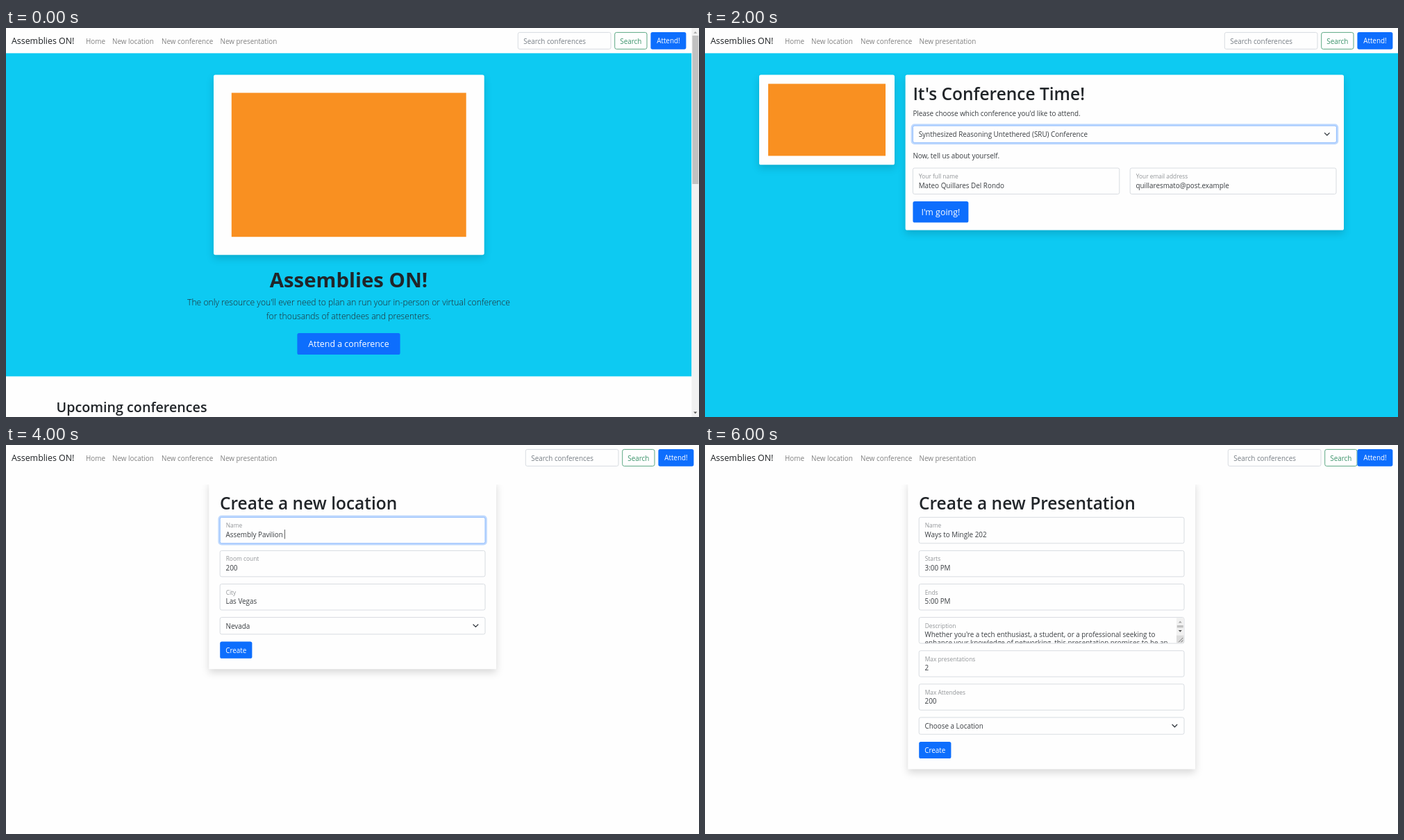
An HTML page for the animation above (7 s loop, 998 by 561 pixels).

```html
<!DOCTYPE html>
<html lang="en">
<head>
<meta charset="utf-8">
<title>Conference pages</title>
<style>
  html, body { margin: 0; width: 100%; height: 100%; overflow: hidden; background: #fefefe; }
  svg { display: block; width: 998px; height: 561px; }
  text { font-family: "Open Sans", "Noto Sans", sans-serif; white-space: pre; }
  .page { visibility: hidden; }
  .page.on { visibility: visible; }
  .shadow { filter: drop-shadow(0 5.2px 5.2px rgba(0, 0, 0, .15)); }
</style>
</head>
<body>
<svg id="stage" viewBox="0 0 998 561">
  <defs>
    <clipPath id="line"><rect x="309" y="249" width="373" height="36"/></clipPath>
    <clipPath id="area"><rect x="309" y="249" width="369" height="36.5"/></clipPath>
  </defs>
</svg>
<script>
const BODY = 9.9, LEAD = 12.4, H2 = 19.7, H1 = 24.5;
const NAV_END = 36.2, CARD_TOP = 67.5;
const INK = '#212529', BLUE = '#0d6efd', CYAN = '#0dcaf2', WHITE = '#fefefe', LINE = '#d4d9de', ORANGE = '#f99021';
const BRAND = 'Assemblies ON!';
const AI_EVENT = 'Synthesized Reasoning Untethered (SRU) Conference';

const attrs = o => Object.entries(o).map(([k, v]) => `${k}="${v}"`).join(' ');
const text = (x, y, str, size = BODY, fill = '#3a3e42', more = {}) =>
  `<text ${attrs({ x, y, 'font-size': size, fill, ...more })}>${str}</text>`;
const rect = (x, y, x2, y2, fill, more = {}) =>
  `<rect ${attrs({ x, y, width: x2 - x, height: y2 - y, fill, ...more })}/>`;
const path = (d, more) => `<path ${attrs({ d, fill: 'none', ...more })}/>`;
const mid = { 'text-anchor': 'middle' };
const semi = { 'font-weight': 600 };

const card = (x, y, x2, y2, rx = 2.6) => rect(x, y, x2, y2, WHITE, { rx, class: 'shadow' });
const box = (x, y, x2, y2, focus) =>
  (focus ? rect(x - 1.2, y - 1.2, x2 + 1.2, y2 + 1.2, 'none', { rx: 3.5, stroke: '#bfd9fe', 'stroke-width': 3.2 }) : '') +
  rect(x, y, x2, y2, WHITE, { rx: 2.4, stroke: focus ? '#86b7fe' : LINE, 'stroke-width': .9 });
const button = (x, y, x2, y2, label, size = BODY) =>
  rect(x, y, x2, y2, BLUE, { rx: 2.6 }) +
  text((x + x2) / 2, (y + y2) / 2 + size * .39, label, size, '#fff', mid);
const chevron = (x, y) => path(`M${x} ${y}l3.4 3.4l3.4 -3.4`,
  { stroke: '#343a40', 'stroke-width': 1.3, 'stroke-linecap': 'round', 'stroke-linejoin': 'round' });
const select = (x, y, x2, label, focus) =>
  box(x, y, x2, y + 24.3, focus) + text(x + 8.3, y + 16.3, label) + chevron(x2 - 17, y + 10.4);
const field = (x, y, x2, label, value, focus, more) =>
  box(x, y, x2, y + 37.5, focus) + text(x + 8.5, y + 15, label, 8.4, '#929598') +
  text(x + 8.3, y + 28.6, value, BODY, '#3a3e42', more);

function nav(dx = 0, fieldDx = dx, right = 998) {
  const links = [[115, 'Home'], [153, 'New location'], [224, 'New conference'], [308.5, 'New presentation']];
  return rect(0, 0, right, NAV_END, WHITE) + text(8, 23.4, BRAND, LEAD, '#1c1f22') +
    links.map(([x, s]) => text(x, 22.5, s, BODY, '#818181')).join('') +
    box(737.3 + fieldDx, 6.4, 871 + fieldDx, 30.4) +
    text(745.3 + fieldDx, 22.5, 'Search conferences', BODY, '#787f86') +
    rect(876.7 + fieldDx, 6.4, 923 + fieldDx, 30.4, WHITE, { rx: 2.6, stroke: '#4b9f78', 'stroke-width': .9 }) +
    text(899.8 + fieldDx, 22.5, 'Search', BODY, '#3c946b', mid) +
    button(928.4 + dx, 6.1, 979.4 + dx, 30.7, 'Attend!');
}

const scrollbar = (top, end, upFill) =>
  rect(987.4, 0, 998, 561, '#f1f1f1') + rect(988.4, top, 997.2, end, '#c1c1c1') +
  path('M990.2 7.8h5l-2.5 -2.8z', { fill: upFill }) +
  path('M990.2 553.4h5l-2.5 2.8z', { fill: '#505050' });

const brokenImage = (x, y) =>
  rect(x + .5, y + .5, x + 10, y + 9.6, '#d5e3f7', { stroke: '#a8abae', 'stroke-width': .8 }) +
  path(`M${x + 1} ${y + 9.2}v-2.2l3.4 -3l4.6 5.2z`, { fill: '#4fa24b' }) +
  path(`M${x + 10.4} ${y + 4.4}l-5 5.6`, { stroke: '#fff', 'stroke-width': 1.3 });

function eventCard(i, [name, place, line1, line2, dates]) {
  const y = 60.2 + i * 141.8;
  return rect(65.3, y, 922, y + 130.3, WHITE, { rx: 2.6, stroke: '#dedede', 'stroke-width': .7, class: 'shadow' }) +
    brokenImage(73, y + .8) +
    text(83.4, y + 33.6, name, 12.3, INK, semi) + text(83.4, y + 54.6, place, 12.3, INK, semi) +
    text(83.4, y + 74.5, line1) + text(83.4, y + 90.1, line2) +
    rect(73, y + 103.8, 914, y + 130, '#f6f6f6') + rect(73, y + 103.5, 914, y + 104.2, '#dcdcdc') +
    text(83.4, y + 121.4, dates);
}

const EVENTS = [
  ['Brontavel Rise', 'Fenlo',
    'OVEQ is the premier global gathering of technology visionaries, innovators, and thought leaders. Join us for a deep dive into emerging technologies, from AI and blockchain to',
    'quantum computing. Explore groundbreaking research, engage in hands-on workshops, and network with the brightest minds in the tech industry.',
    '8/31/2023 - 9/2/2023'],
  ['Visions of Wardcare Gathering', 'Ostermay Center',
    'The Visions of Wardcare Gathering is your gateway to cutting-edge healthcare innovations. Explore telemedicine, precision medicine, and healthcare AI. Engage with healthcare',
    'professionals, researchers, and policymakers shaping the future of medicine.',
    '9/3/2023 - 9/4/2023'],
  ['MossForge Fair 2023', 'Assembly Pavilion',
    'MossForge Fair is the leading event for sustainable technology and eco-friendly solutions. Discover the latest advancements in renewable energy, sustainable transportation, and',
    'environmental conservation. Connect with experts, policymakers, and entrepreneurs dedicated to creating a greener future.',
    '9/5/2023 - 9/7/2023'],
  [AI_EVENT, 'Broad Exhibition',
    'SRU is where artificial intelligence takes center stage! Dive into the world of AI and machine learning with top-notch speakers, interactive labs, and real-world AI applications.',
    '', '']
];

const home = () =>
  rect(0, NAV_END, 987.4, 502.4, CYAN) + nav(0, 0, 987.4) +
  card(299, CARD_TOP, 688.7, 327.2) + rect(324.8, 93.5, 662.7, 301.2, ORANGE) +
  text(493.5, 374.3, BRAND, 29.4, INK, { ...mid, 'font-weight': 700 }) +
  ["The only resource you'll ever need to plan an run your in-person or virtual conference",
    'for thousands of attendees and presenters.']
    .map((s, i) => text(493.5, 400.3 + i * 19.6, s, 12.17, INK, { ...mid, 'font-weight': 300 })).join('') +
  button(419.4, 440, 567.6, 471, 'Attend a conference', LEAD) +
  text(72.6, 554, 'Upcoming conferences', H2, INK, semi) + scrollbar(11, 225, '#a3a3a3');

const list = () =>
  text(72.6, 50.2, 'Upcoming conferences', H2, INK, semi) +
  EVENTS.map((e, i) => eventCard(i, e)).join('') + scrollbar(203, 416.5, '#505050');

const attend = content =>
  rect(0, NAV_END, 998, 561, CYAN) + nav(11) +
  card(78, CARD_TOP, 273, 197.3) + rect(91, 80.5, 260, 184.4, ORANGE) + content;

const signup = () => attend(
  card(288.6, CARD_TOP, 920, 291.6) +
  text(299.4, 104, "It's Conference Time!", H1, INK, semi) +
  text(299.4, 126.8, "Please choose which conference you'd like to attend.") +
  select(299.4, 141, 909.4, AI_EVENT, true) +
  text(299.4, 187.6, 'Now, tell us about yourself.') +
  field(299.4, 202, 596.8, 'Your full name', 'Mateo Quillares Del Rondo') +
  field(612.2, 202, 909, 'Your email address', 'quillaresmato@post.example') +
  button(299.4, 250, 379.4, 280.5, "I'm going!", LEAD));

const done = () => attend(
  card(288.6, CARD_TOP, 920, 126.8) +
  rect(299.4, 78.8, 909, 115.6, '#d1e7dd', { rx: 2.4, stroke: '#badbcc', 'stroke-width': .8 }) +
  text(310, 101.4, "Congratulations! You're all signed up!", BODY, '#2c6449'));

function form(title, fields, choice, extra = '', navBar = nav(11)) {
  const y = 104.3 + fields.length * 48.1;
  return card(292.3, 52, 706, y + 74.6, 0) + rect(280, NAV_END, 720, 57, WHITE) + navBar +
    text(308, 93.2, title, H1, INK, semi) +
    fields.map((f, i) => field(308.2, 104.3 + i * 48.1, 690, ...f)).join('') +
    select(308.2, y, 690, choice) + button(308.2, y + 35, 354.4, y + 59.2, 'Create') + extra;
}

const calendar = y =>
  rect(671.6, y + 1.4, 679, y + 9, 'none', { stroke: '#222', 'stroke-width': 1.1 }) +
  rect(671, y + 1, 679.6, y + 3.3, '#222') + rect(672.4, y, 673.6, y + 2, '#222') + rect(677, y, 678.2, y + 2, '#222');

const newLocation = () => form('Create a new location', [
  ['Name', 'Assembly Pavilion', true], ['Room count', '200'], ['City', 'Las Vegas']
], 'Nevada', rect(401, 122, 401.7, 135.4, '#222'));

const newConference = () => form('Create a new conference', [
  ['Name', 'MossForge Fair 2023'], ['Starts', '09/13/2023'], ['Ends', '09/15/2023'],
  ['Description', 'MossForge Fair is the leading event for sustainable technology and eco-friendly solutions.', false, { 'clip-path': 'url(#line)' }],
  ['Maximum presentations', '3'], ['Maximum attendees', '200']
], 'Finn Center', calendar(171) + calendar(219));

const areaBar =
  rect(679, 249.2, 689.6, 285.4, '#f1f1f1') + rect(679.8, 260, 688.8, 263.4, '#c1c1c1') +
  path('M681.8 256.6h5l-2.5 -2.8z', { fill: '#a3a3a3' }) + path('M681.8 267h5l-2.5 2.8z', { fill: '#505050' }) +
  rect(679, 274.6, 689.6, 285.4, '#dcdcdc') +
  path('M682 284.4l6.4 -6.4M685.6 284.4l2.8 -2.8', { stroke: '#777', 'stroke-width': 1 });

const newTalk = () => form('Create a new Presentation', [
  ['Name', 'Ways to Mingle 202'], ['Starts', '3:00 PM'], ['Ends', '5:00 PM'],
  ['Description', "Whether you're a tech enthusiast, a student, or a professional seeking to"],
  ['Max presentations', '2'], ['Max Attendees', '200']
], 'Choose a Location',
  text(316.5, 289, 'enhance your knowledge of networking, this presentation promises to be an',
    BODY, '#3a3e42', { 'clip-path': 'url(#area)' }) + areaBar,
  nav(11, 16));

const STEP = 1000;
const stage = document.getElementById('stage');
const builders = [home, list, signup, done, newLocation, newConference, newTalk];
stage.insertAdjacentHTML('beforeend', builders.map(b => `<g class="page">${b()}</g>`).join(''));
const pages = [...stage.querySelectorAll('.page')];

function tick() {
  const now = Math.floor(performance.now() / STEP) % pages.length;
  pages.forEach((p, i) => p.classList.toggle('on', i === now));
  requestAnimationFrame(tick);
}
tick();
</script>
</body>
</html>
```
